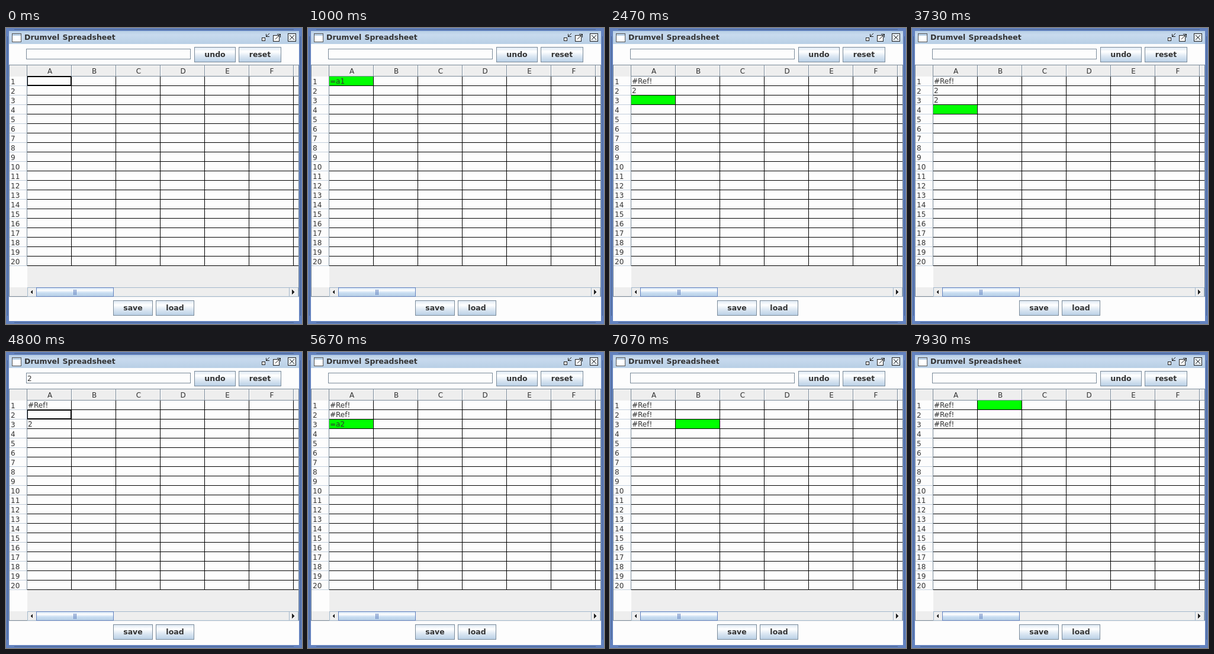
These frames come from a looping animation (500x500 px, 8000 ms). An HTML page:

```html
<!DOCTYPE html>
<html lang="en">
<head>
<meta charset="utf-8">
<title>Spreadsheet</title>
<style>
  html, body { margin: 0; width: 100%; height: 100%; overflow: hidden; background: #fdfdfd; }
  svg { display: block; width: 100vw; height: 100vh; shape-rendering: crispEdges; }
  text { font: 12px "DejaVu Sans", sans-serif; fill: #333333; white-space: pre; }
  .bold { font-weight: bold; font-size: 12.5px; }
  .mid { text-anchor: middle; }
</style>
</head>
<body>
<svg viewBox="0 0 500 500">
  <defs>
    <linearGradient id="title" x2="0" y2="1">
      <stop stop-color="#b8cfe5"/><stop offset=".3" stop-color="#c8daee"/>
      <stop offset="1" stop-color="#b8cfe5"/>
    </linearGradient>
    <linearGradient id="button" x2="0" y2="1">
      <stop stop-color="#dde8f3"/><stop offset=".3" stop-color="#ffffff"/>
      <stop offset=".6" stop-color="#dde8f3"/><stop offset="1" stop-color="#b8cfe5"/>
    </linearGradient>
    <linearGradient id="thumb" x2="0" y2="1">
      <stop stop-color="#c8ddf2"/><stop offset=".3" stop-color="#ffffff"/>
      <stop offset=".6" stop-color="#c8ddf2"/><stop offset="1" stop-color="#b8cfe5"/>
    </linearGradient>
  </defs>
  <g id="chrome"></g>
  <g id="cells"></g>
</svg>
<script>
const LOOP = 8000, LEFT = 36, TOP = 82, COL_W = 75, ROW_H = 16, ROWS = 20;
const STEEL = '#7a8a99', GREY = '#eeeeee', PAPER = '#fdfdfd', EDGE = '#a3b8cc', INK = '#222222';

const rect = (x, y, w, h, fill) => `<rect x="${x}" y="${y}" width="${w}" height="${h}" fill="${fill}"/>`;
const box = (x, y, w, h, fill, stroke, line = 1) =>
  `<rect x="${x + line / 2}" y="${y + line / 2}" width="${w - line}" height="${h - line}" fill="${fill}" stroke="${stroke}" stroke-width="${line}"/>`;
const path = (d, stroke, fill = 'none') => `<path d="${d}" stroke="${stroke}" fill="${fill}"/>`;
const text = (x, y, str, cls = '') => `<text x="${x}" y="${y}" class="${cls}">${str}</text>`;
const button = (x, y, w, label) =>
  box(x, y, w, 26, 'url(#button)', STEEL) + text(x + w / 2, y + 17, label, 'bold mid');

function drawFrame() {
  return box(0, 0, 500, 500, 'none', '#6382bf', 5) +
    path('M14 2.5H486M14 497.5H486M2.5 14V486M497.5 14V486', '#4a648f') +
    rect(5, 5, 490, 22, 'url(#title)') +
    box(10, 9, 16, 15, '#ffffff', '#555555') + rect(11, 10, 14, 3, '#b8cfe5') +
    text(31, 20, 'Drumvel', 'bold') + text(95.5, 20, 'Spreadsheet', 'bold') +
    box(432, 16, 6, 6, '#ffffff', INK) +
    path('M445 9L440 14M439.5 10V14.5H445', INK) +
    box(451, 12, 11, 11, '#ffffff', INK) +
    path('M455 19L463 11M458 10.5H463.5V16', INK) +
    box(476, 9, 14, 14, '#e8f0f8', INK) +
    path('M479 12L487 20M487 12L479 20', INK);
}

function drawTable() {
  const height = ROWS * ROW_H;
  let out = rect(5, 62, 490, 393, GREY) + rect(6, TOP, 30, 356, PAPER) +
    rect(LEFT, TOP, 458, height, PAPER);
  for (let r = 0; r < ROWS; r++) {
    const y = TOP + r * ROW_H;
    out += rect(6, y + 15, 29, 1, '#c2cedb') + rect(LEFT, y + 15, 458, 1, '#000') + text(8, y + 13, r + 1);
  }
  for (let c = 0; c < 6; c++) {
    const x = LEFT + c * COL_W;
    out += rect(x + 74, 63, 1, 18, STEEL) + rect(x + 75, 63, 1, 18, '#ffffff') +
      rect(x + 74, TOP, 1, height, '#000') +
      text(x + 38, 77, 'ABCDEF'[c], 'mid');
  }
  return out + rect(35, 63, 1, 339, STEEL) + rect(36, 81, 458, 1, STEEL) +
    path('M494.5 62V453.5H5.5V62.5H494', STEEL);
}

function drawScrollbar() {
  const grip = [114, 116, 118].map(x => rect(x, 442, 1, 9, '#6382bf')).join('');
  return box(36, 438, 458, 16, GREY, EDGE) +
    box(36, 438, 16, 16, GREY, EDGE) + box(478, 438, 16, 16, GREY, EDGE) +
    path('M45 442V450L41 446ZM483 442V450L487 446Z', 'none', INK) +
    box(51, 438, 131, 16, 'url(#thumb)', '#6382bf') + grip;
}

document.getElementById('chrome').innerHTML = drawFrame() +
  box(34, 35, 278, 18, PAPER, STEEL) +
  button(318, 32, 70, 'undo') + button(393, 32, 72, 'reset') +
  drawTable() + drawScrollbar() +
  button(181, 460, 67, 'save') + button(253, 460, 65, 'load');

// Each step: start time, active cell, values of column A, active text, editing flag, formula bar.
const REF = '#Ref!';
const steps = [];
const step = (at, cell, column, entry = '', editing = false, bar = '') =>
  steps.push({ at, cell, column, entry, editing, bar });
const type = (times, cell, column, str, bar) =>
  times.forEach((at, i) => step(at, cell, column, str.slice(0, i + 1), true, bar));

step(0, 'A1', [], '', true);
type([330, 530, 730], 'A1', [], '=a1');
step(930, 'A1', [], '=a1');
step(1200, 'A2', [REF]);
type([1660], 'A2', [REF], '2');
step(2070, 'A3', [REF, 2]);
type([2670, 2870, 3070], 'A3', [REF, 2], '=a2');
step(3470, 'A4', [REF, 2, 2]);
step(4070, 'A3', [REF, 2, 2], '=a2');
step(4270, 'A2', [REF, 2, 2], '2');
step(4600, 'A2', [REF, 2, 2], '', true, '2');
type([4930, 5130, 5330], 'A2', [REF, 2, 2], '=a3', '2');
step(5670, 'A3', [REF, REF, REF], '=a2');
step(5930, 'A4', [REF, REF, REF]);
step(6270, 'B4', [REF, REF, REF]);
step(7000, 'B3', [REF, REF, REF]);
step(7270, 'B2', [REF, REF, REF]);
step(7530, 'B1', [REF, REF, REF]);

function drawCells({ cell, column, entry, editing, bar }) {
  const x = LEFT + 'ABCDEF'.indexOf(cell[0]) * COL_W;
  const y = TOP + (cell.slice(1) - 1) * ROW_H;
  const values = column.map((value, r) => text(37, TOP + r * ROW_H + 12, value)).join('');
  const active = editing
    ? rect(x, y - 1, 74, 1, '#000') + box(x, y, 74, 15, PAPER, '#000')
    : rect(x, y, 74, 15, '#00ff00');
  return values + active + text(x + 1, y + 12, entry) + text(36, 49, bar);
}

const cells = document.getElementById('cells');
let shown;
function render(now) {
  const t = now % LOOP;
  const current = steps.findLast(s => s.at <= t);
  if (current !== shown) cells.innerHTML = drawCells(shown = current);
  requestAnimationFrame(render);
}
render(0);
</script>
</body>
</html>
```
